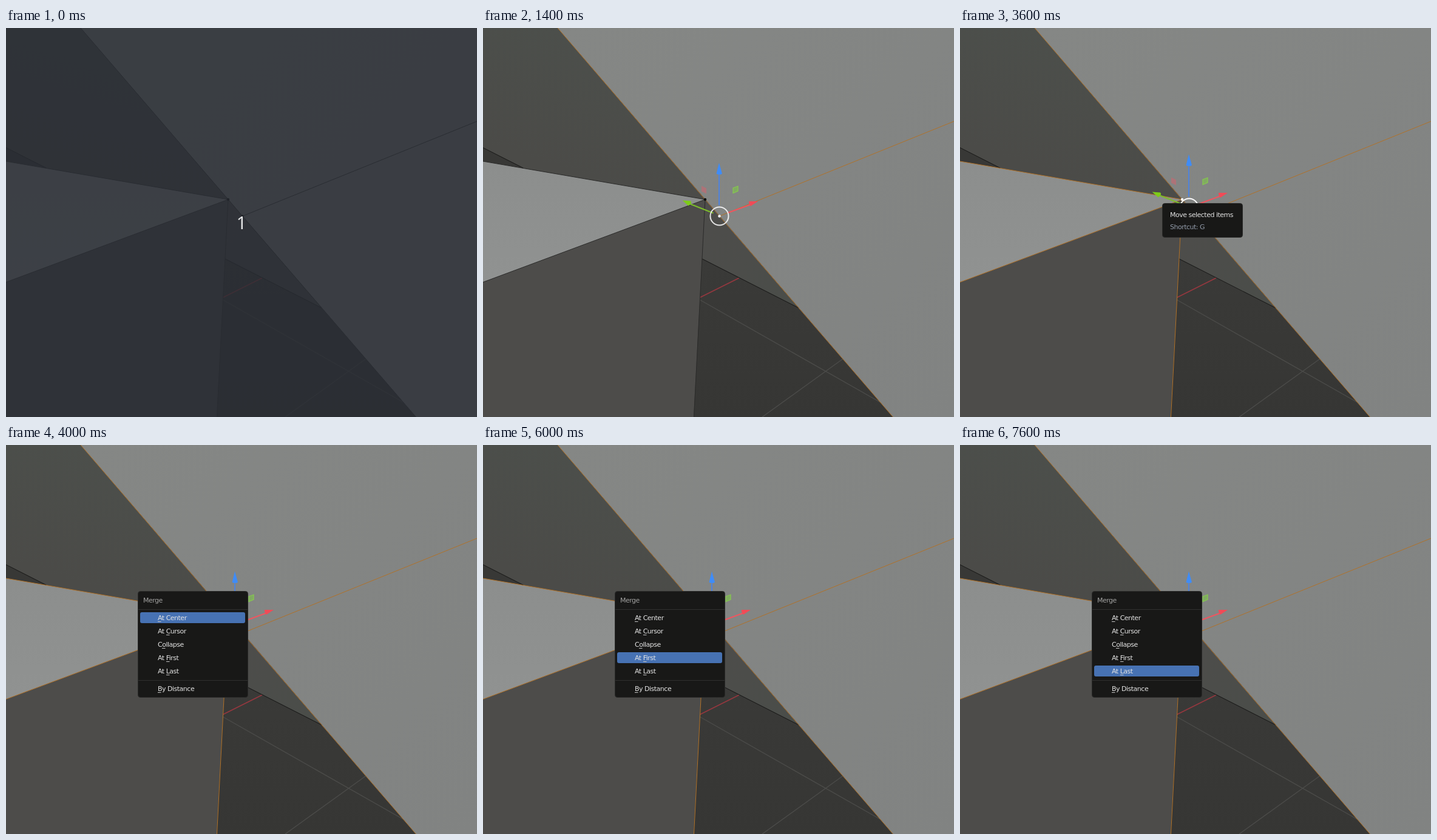
An HTML page that plays this animation: 776 px wide and 642 px high, repeating every 8000 ms.

```html
<!DOCTYPE html>
<html lang="en">
<head>
<meta charset="utf-8">
<title>Merge vertices</title>
<style>
  html, body { margin: 0; width: 100%; height: 100%; overflow: hidden; background: #383836; }
  svg { display: block; width: 776px; height: 642px; }
  text { font: 11px "DejaVu Sans", sans-serif; letter-spacing: -0.5px; fill: #e3e3e3; white-space: pre; }
  .edge { fill: none; stroke: #2b2b2a; stroke-width: 1; }
  .edge.lit { stroke: #b07128; }
  .rim { fill: none; stroke: #1c1c1b; stroke-width: 1.1; }
  .grid { fill: none; stroke: #4b4b49; stroke-width: 1.4; }
  .panel { fill: #181817; stroke: #2a2a29; stroke-width: 1; }
  .rule { fill: #30302f; }
  .value { fill: #929baa; }
  #number { font: 29px "Noto Sans", "Open Sans", sans-serif; letter-spacing: 0; fill: #e4e5e6; }
</style>
</head>
<body>
<svg viewBox="0 0 776 642">
  <defs>
    <linearGradient id="back" gradientUnits="userSpaceOnUse" x1="130" y1="0" x2="60" y2="210">
      <stop offset="0" stop-color="#4c4f4b"/><stop offset="1" stop-color="#4b4b48"/>
    </linearGradient>
    <linearGradient id="wedge" x1="0" y1="0" x2="1" y2="1">
      <stop offset="0" stop-color="#4e4d4b"/><stop offset="1" stop-color="#4a4d49"/>
    </linearGradient>
    <linearGradient id="spike" x1="0" y1="0" x2="0" y2="1">
      <stop offset="0" stop-color="#8c8e8d"/><stop offset="1" stop-color="#909291"/>
    </linearGradient>
    <linearGradient id="wall" x1="0" y1="0" x2="1" y2="1">
      <stop offset="0" stop-color="#858785"/><stop offset="1" stop-color="#818382"/>
    </linearGradient>
    <linearGradient id="floor" x1="0" y1="0" x2="0" y2="1">
      <stop offset="0" stop-color="#3a3a38"/><stop offset="1" stop-color="#363634"/>
    </linearGradient>
  </defs>

  <g id="scene">
    <rect width="776" height="642" fill="#383836"/>
    <path fill="url(#floor)" d="M361 381L520 462L675 642H347Z"/>
    <path class="grid" d="M358 449L655 618M460 642L593 546"/>
    <path d="M357 445L422 412.500" stroke="#96383f" stroke-width="1.6"/>
    <path fill="url(#back)" d="M0 0H123L366 283L66 231L0 197.500Z"/>
    <path fill="url(#wedge)" d="M366 283L520 462L361 381Z"/>
    <path fill="#4d4c4a" d="M366 283L0 419.500V642H347Z"/>
    <path fill="url(#spike)" d="M366 283L0 220V419.500Z"/>
    <path fill="url(#wall)" d="M123 0H776V642H675.500Z"/>
    <path class="rim" d="M0 197.500L66 231M361 381L520 462"/>
    <path class="edge" id="edgesA" d="M123 0L366 283L389.500 310.500L675.500 642M389.500 310.500L776 154"/>
    <path class="edge" id="edgesB" d="M0 220L366 283L0 419.500M366 283L347.500 642"/>
    <circle id="dotA" cx="389.500" cy="310.500" r="2.200"/>
    <circle id="dotB" cx="366" cy="283" r="2.200"/>
  </g>

  <g id="gizmo">
    <path fill="#d8606c" fill-opacity=".5" d="M-29.500 -50L-21.500 -46V-37L-29.500 -41Z"/>
    <path fill="#7fc44a" fill-opacity=".6" stroke="#86c94f" stroke-width="1.2" d="M22.500 -46.500L30.500 -49.500V-41.500L22.500 -38Z"/>
    <path d="M-.500 -18V-68" stroke="#4f83dc" stroke-width="2"/>
    <path fill="#3f8cf7" d="M-.500 -88L4.500 -70Q0 -67 -5 -70Z"/>
    <path d="M-10 -5L-48 -20" stroke="#7dbb2c" stroke-width="2"/>
    <path fill="#7dcc18" d="M-61 -26L-47.500 -25Q-44 -22 -51 -17Z"/>
    <path d="M14 -5.500L51 -19" stroke="#ee5660" stroke-width="2"/>
    <path fill="#f04b57" d="M63.500 -24.500L48.500 -24.500Q48 -20 51.500 -16.500Z"/>
    <circle id="ring" r="15" fill="none" stroke="#fff" stroke-width="2"/>
  </g>

  <g id="menu">
    <rect class="panel" x="217.500" y="241.500" width="181" height="175" rx="4"/>
    <text x="226" y="260" style="fill:#a3a3a2">Merge</text>
    <rect class="rule" x="218" y="271" width="180" height="1"/>
    <rect class="rule" x="218" y="388" width="180" height="1"/>
    <rect id="bar" x="221" width="173" height="18" rx="3" fill="#4772b3"/>
    <g id="items"></g>
  </g>

  <g id="moveTip">
    <rect class="panel" x="333.500" y="289.500" width="132" height="56" rx="4"/>
    <text x="346" y="312">Move selected items</text>
    <text class="value" x="346" y="332">Shortcut: G</text>
  </g>
  <g id="mergeTip">
    <rect class="panel" x="315" y="372.500" width="190.500" height="35.500" rx="4"/>
    <text x="327" y="395">Merge selected vertices:</text>
    <text class="value" x="455" y="395">At First</text>
  </g>

  <g id="card">
    <rect width="776" height="642" fill="#282c34" fill-opacity=".8"/>
    <text id="number" x="388" y="332" text-anchor="middle">1</text>
  </g>
</svg>
<script>
const $ = id => document.getElementById(id);
const LOOP = 8000;

// label, row centre, x of the underlined access key
const items = [
  ["At Center", 285, 250], ["At Cursor", 307, 264], ["Collapse", 329, 257],
  ["At First", 351, 264], ["At Last", 373, 264], ["By Distance", 402, 250]
];
$("items").innerHTML = items.map(([label, y, key]) =>
  `<text x="250" y="${y + 4}">${label}</text>` +
  `<rect x="${key}" y="${y + 6}" width="5.500" height="1" fill="#c4c4c4"/>`).join("");

// Each step changes only the listed parts of the state.
const start = { card: true, picked: 0, hover: false, menu: false, row: -1, moveTip: false, mergeTip: false };
const steps = [
  [200, { card: false }],
  [1200, { picked: 1 }],
  [1600, { hover: true }],
  [1800, { hover: false }],
  [2600, { picked: 2 }],
  [3200, { hover: true }],
  [3600, { moveTip: true }],
  [4000, { moveTip: false, hover: false, menu: true, row: 0 }],
  [5600, { row: -1 }],
  [5800, { row: 2 }],
  [6000, { row: 3 }],
  [6600, { mergeTip: true }],
  [7600, { mergeTip: false, row: 4 }]
];

const show = (id, on) => $(id).style.display = on ? "" : "none";

function draw(t) {
  const s = { ...start };
  for (const [at, change] of steps) if (t >= at) Object.assign(s, change);

  for (const id of ["card", "menu", "moveTip", "mergeTip"]) show(id, s[id]);
  $("edgesA").classList.toggle("lit", s.picked > 0);
  $("edgesB").classList.toggle("lit", s.picked > 1);
  $("dotA").setAttribute("fill", ["#0c0c0c", "#fff", "#e88a2c"][s.picked]);
  $("dotB").setAttribute("fill", s.picked > 1 ? "#fff" : "#0c0c0c");

  show("gizmo", s.picked > 0);
  $("gizmo").setAttribute("transform",
    s.picked === 1 ? "translate(389.5 310.5)" : "translate(377.5 296.5)");
  $("ring").setAttribute("stroke-opacity", s.hover ? 1 : 0.85);

  show("bar", s.row >= 0);
  if (s.row >= 0) $("bar").setAttribute("y", items[s.row][1] - 9);
}

function tick() {
  draw(performance.now() % LOOP);
  requestAnimationFrame(tick);
}
tick();
</script>
</body>
</html>
```
